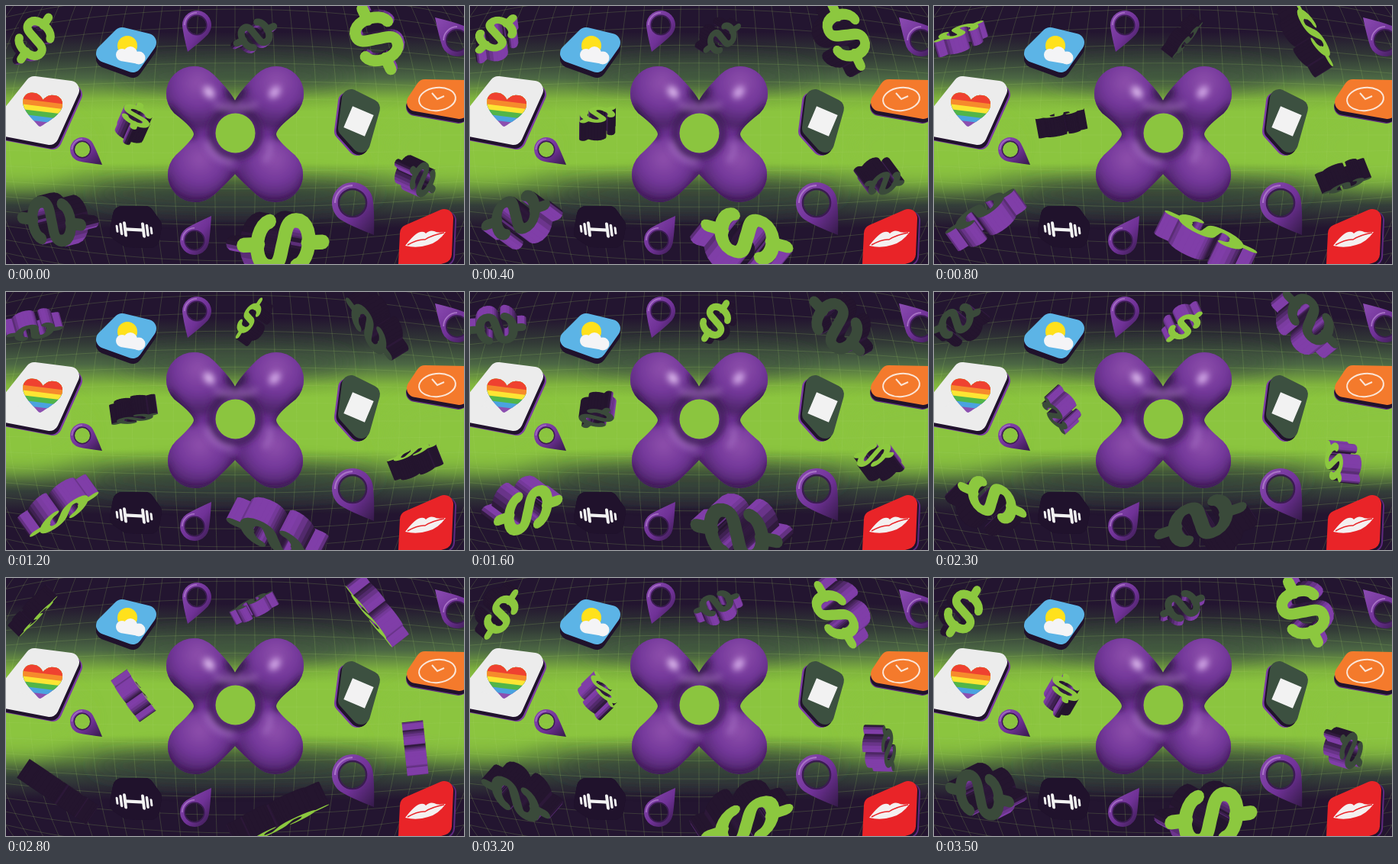
An HTML page with a canvas for the animation above (3.6 s loop, 600 px wide and 338 px high).

```html
<!DOCTYPE html>
<html lang="en">
<head>
<meta charset="utf-8">
<title>Spinning dollars</title>
<style>
html, body { margin: 0; width: 100%; height: 100%; overflow: hidden; background: #231530; }
svg, canvas { position: absolute; left: 0; top: 0; width: 600px; height: 338px; }
</style>
</head>
<body>
<svg viewBox="0 0 600 338">
  <defs>
    <linearGradient id="band" x2="0" y2="1">
      <stop offset=".1" stop-color="#231530"/>
      <stop offset=".2" stop-color="#333c37"/>
      <stop offset=".28" stop-color="#4c6844"/>
      <stop offset=".36" stop-color="#80b43e"/>
      <stop offset=".41" stop-color="#8bc53f"/>
      <stop offset=".61" stop-color="#8bc53f"/>
      <stop offset=".7" stop-color="#5c813d"/>
      <stop offset=".77" stop-color="#35403a"/>
      <stop offset=".86" stop-color="#231530"/>
    </linearGradient>
    <radialGradient id="lobe" cx=".52" cy=".32" r=".7">
      <stop offset="0" stop-color="#8f50ac"/>
      <stop offset=".5" stop-color="#73379a"/>
      <stop offset="1" stop-color="#43205c"/>
    </radialGradient>
    <linearGradient id="ring" x2="1" y2="1">
      <stop offset="0" stop-color="#8b4cb2"/>
      <stop offset=".55" stop-color="#6f3196"/>
      <stop offset="1" stop-color="#341a48"/>
    </linearGradient>
    <filter id="soft" x="-50%" y="-50%" width="200%" height="200%"><feGaussianBlur stdDeviation="4"/></filter>
    <filter id="haze" x="-50%" y="-50%" width="200%" height="200%"><feGaussianBlur stdDeviation="12"/></filter>
    <path id="body" d="M300,124 Q294,112 271.500,89.500 A36,36 0 1 0 220.500,140.500 Q246,160 246,168 Q246,174 222.500,195.500 A36,36 0 1 0 273.500,246.500 Q294,227 300,220 Q306,227 327.500,246.500 A36,36 0 1 0 378.500,195.500 Q354,175 354,168 Q354,160 379.500,140.500 A36,36 0 1 0 328.500,89.500 Q306,112 300,124Z"/>
    <clipPath id="bodyClip"><use href="#body"/></clipPath>
    <clipPath id="heart"><path d="M0,23 C-10,14 -27,3 -26,-10 C-25,-23 -7,-25 0,-13 C7,-25 25,-23 26,-10 C27,3 10,14 0,23Z"/></clipPath>
  </defs>

  <rect width="600" height="338" fill="url(#band)"/>
  <g filter="url(#haze)">
    <ellipse cx="300" cy="92" rx="150" ry="20" fill="#3d4f3c" opacity=".6"/>
    <ellipse cx="300" cy="246" rx="190" ry="20" fill="#303a37" opacity=".7"/>
    <ellipse cx="15" cy="185" rx="90" ry="50" fill="#8bc53f" opacity=".85"/>
    <ellipse cx="585" cy="185" rx="90" ry="50" fill="#8bc53f" opacity=".85"/>
  </g>
  <path id="grid" fill="none" stroke="#a5d66b" stroke-width=".7" opacity=".28"/>

  <!-- centre sculpture -->
  <use href="#body" fill="#6a3090"/>
  <g clip-path="url(#bodyClip)">
    <g fill="url(#lobe)" filter="url(#soft)">
      <circle cx="250" cy="117" r="44"/><circle cx="352" cy="117" r="44"/>
      <circle cx="252" cy="216" r="44"/><circle cx="350" cy="216" r="44"/>
    </g>
    <g filter="url(#soft)" fill="none">
      <path d="M208,225 C212,264 275,275 300,222 C325,275 392,264 394,222" stroke="#2b153c" stroke-width="9" opacity=".75"/>
      <path d="M211,132 Q236,158 246,172M391,132 Q362,158 354,174M290,108 L300,126 L312,108" stroke="#2b153c" stroke-width="10" opacity=".85"/>
      <circle cx="300" cy="166" r="31" stroke="#3c1c55" stroke-width="8"/>
      <path d="M262,178 Q270,203 298,206M338,204 Q348,194 345,178M272,128 Q300,138 330,128" stroke="#ad78cb" stroke-width="5" opacity=".8"/>
      <ellipse cx="266" cy="113" rx="6" ry="9" fill="#e0bdf0" transform="rotate(-40 266 113)"/>
      <ellipse cx="352" cy="113" rx="6" ry="9" fill="#d5acea" transform="rotate(40 352 113)"/>
    </g>
  </g>
  <circle cx="300.500" cy="166.500" r="26" fill="#8bc53f"/>

  <g id="tiles" stroke-width="24" stroke-linejoin="round"></g>
  <circle cx="159" cy="52" r="13" fill="#ffe11c"/>
  <g fill="#f4f4f6"><circle cx="152" cy="64" r="8"/><circle cx="163" cy="62" r="9"/><circle cx="174" cy="68" r="8.500"/><path d="M150,72 152,60 176,62 174,76Z"/></g>
  <g transform="translate(47 136) rotate(7)"><g clip-path="url(#heart)" id="stripes"></g></g>
  <g fill="#f2f2f2" transform="translate(168 293) rotate(3) skewX(10)">
    <rect x="-12" y="-2" width="24" height="4"/>
    <rect x="-14" y="-10" width="4" height="20" rx="2"/><rect x="10" y="-10" width="4" height="20" rx="2"/>
    <rect x="-19" y="-8" width="3.500" height="16" rx="1.700"/><rect x="15.500" y="-8" width="3.500" height="16" rx="1.700"/>
    <rect x="-24" y="-5" width="3" height="10" rx="1.500"/><rect x="21" y="-5" width="3" height="10" rx="1.500"/>
  </g>
  <rect x="-15" y="-15" width="30" height="30" fill="#f2f2f2" transform="translate(462 151) rotate(23)"/>
  <g fill="none" stroke="#fbe6d8" stroke-width="2">
    <ellipse cx="565" cy="122" rx="24" ry="15" transform="rotate(-6 565 122)"/>
    <path d="M558,114 565,122 574,118"/>
  </g>
  <path d="M523,314 Q536,297 543,296 Q548,295 550,298 Q555,293 561,295 Q565,298 576,296 Q566,310 553,313 Q538,318 523,314Z" fill="#f4f0f0"/>
  <path d="M526,313 Q540,305 549,306 Q558,300 574,297" fill="none" stroke="#e92428" stroke-width="1.500"/>

  <g id="pins"></g>
</svg>
<canvas id="stage" width="1200" height="676"></canvas>

<script>
const $ = id => document.getElementById(id);
const { PI, sin, cos, atan2, min, max } = Math;
const rad = PI / 180;

// Barrel-warped grid
let grid = '';
const warp = (u, v) => [300 + 350 * u * (1 - .18 * v * v), 169 + 212 * v * (1 - .18 * u * u)]
  .map(n => n.toFixed(1)).join();
const steps = Array.from({ length: 25 }, (_, k) => (k - 12) / 10);
const line = point => 'M' + steps.map(point).join('L');
for (let i = -15; i <= 15; i++) grid += line(s => warp(i / 13, s));
for (let i = -10; i <= 10; i++) grid += line(s => warp(s, i / 9));
$('grid').setAttribute('d', grid);

// Rounded tiles: inner corners, face colour, side offset, side colour
const purple = '#7b3ca3', night = '#20122c';
const tiles = [
  ['152,40 185,48 166,75 130,62', '#5cb4e6', 0, 7, night],
  ['37,104 84,110 57,170 -6,158', '#ececec', 4, 6, purple],
  ['152,274 182,274 192,288 189,305 160,304 148,296', night, 0, 0, night],
  ['452,121 478,134 465,180 447,160', '#3c5040', -5, 4, purple],
  ['549,108 606,109 594,136 537,126', '#f47a2c', -1, 6, '#5e2a80'],
  ['528,298 574,278 572,325 526,338', '#e92428', 4, 3, '#5e2a80']
];
const slab = (pts, color, x, y) =>
  `<polygon points="${pts}" fill="${color}" stroke="${color}" transform="translate(${x} ${y})"/>`;
$('tiles').innerHTML = tiles.map(([pts, face, x, y, side]) =>
  slab(pts, side, x, y) + slab(pts, night, x / 2, y * .8) + slab(pts, face, 0, 0)).join('');

$('stripes').innerHTML = ['#ef4130', '#f68a2c', '#fde533', '#52b548', '#4aa3df', '#8c4fb0']
  .map((c, i) => `<rect x="-30" y="-30" width="60" height="${19 + i * 6.6}" fill="${c}"/>`).reverse().join('');

// Map pins: ring centre, radius, tip
const pins = [[250, 25, 19, 238, 60], [591, 45, 21, 562, 15], [100, 188, 16, 126, 208],
  [454, 258, 27, 482, 300], [247, 307, 19, 269, 275]];
const circle = (x, y, r) => `M${x - r},${y}a${r},${r} 0 1 0 ${2 * r},0a${r},${r} 0 1 0 ${-2 * r},0Z`;
$('pins').innerHTML = pins.map(([x, y, r, tx, ty]) => {
  const a = atan2(ty - y, tx - x);
  const at = (d, k) => `${x + k * r * cos(a + d)},${y + k * r * sin(a + d)}`;
  const drop = `M${at(1.2, 1)}Q${at(.62, 1.15)} ${tx},${ty}Q${at(-.62, 1.15)} ${at(-1.2, 1)}A${r},${r} 0 1 0 ${at(1.2, 1)}Z`;
  return `<path fill="url(#ring)" fill-rule="evenodd" d="${drop}${circle(x, y, r * .64)}"/>
    <circle cx="${x}" cy="${y}" r="${r * .67}" fill="none" stroke="#3a1c50" stroke-width="${r * .09}"/>
    <path d="M${x - r * .85},${y}A${r * .85},${r * .85} 0 0 1 ${x},${y - r * .85}" fill="none" stroke="#a873c6" stroke-width="${r * .08}"/>`;
}).join('');

// Dollar glyph as rounded strokes; each outline vertex is [x, y, nx, ny]
const W = .15;
function outline(pts) {
  const n = pts.length, left = [], right = [];
  const add = (list, p, a) => list.push([p[0] + W * cos(a), p[1] + W * sin(a), cos(a), sin(a)]);
  const heading = i => {
    const a = pts[max(i - 1, 0)], b = pts[min(i + 1, n - 1)];
    return atan2(b[1] - a[1], b[0] - a[0]);
  };
  pts.forEach((p, i) => add(left, p, heading(i) - PI / 2));
  for (let k = 1; k < 6; k++) add(left, pts[n - 1], heading(n - 1) - PI / 2 + k * PI / 6);
  for (let i = n - 1; i >= 0; i--) add(right, pts[i], heading(i) + PI / 2);
  for (let k = 1; k < 6; k++) add(right, pts[0], heading(0) + PI / 2 + k * PI / 6);
  return left.concat(right);
}
function bezier(a, b, c, d) {
  return Array.from({ length: 12 }, (_, i) => {
    const t = i / 12, s = 1 - t;
    return [0, 1].map(k => s * s * s * a[k] + 3 * s * s * t * b[k] + 3 * s * t * t * c[k] + t * t * t * d[k]);
  });
}
const half = [...bezier([.46, -.3], [.38, -.64], [-.46, -.7], [-.46, -.28]),
  ...bezier([-.46, -.28], [-.46, -.06], [-.2, -.06], [0, 0])];
const curve = [...half, [0, 0], ...half.map(([x, y]) => [-x, -y]).reverse()];
const glyph = [curve, [[0, -.55], [0, -.88]], [[0, .55], [0, .88]]].map(outline);

// x, y, half length, depth, axis angle, tilt, glyph turn, phase
const signs = [
  [35, 43, 38, .55, -31, 14, 66, 5],
  [325, 39, 31, .6, 140, 12, 75, 180],
  [486, 42, 50, .55, 55, 3, -80, 5],
  [167, 154, 32, .8, -68, 57, -90, 3],
  [536, 223, 34, .8, 212, 52, 90, 190],
  [68, 280, 53, .55, 0, 34, -90, 190],
  [356, 310, 65, .5, 0, 25, 90, 5]
];
const ctx = $('stage').getContext('2d');
const rot = (a, b, t) => [a * cos(t) - b * sin(t), a * sin(t) + b * cos(t)];
const dark = [36, 21, 46], lit = [128, 62, 168];

function drawSign([cx, cy, size, depth, axis, tilt, turn, phase], angle) {
  const spin = (x, y, z) => {
    [x, y] = rot(x, y, turn * rad);
    [z, x] = rot(z, x, tilt * rad);
    [y, z] = rot(y, z, (angle - phase) * rad);
    [x, y] = rot(x, y, axis * rad);
    return [x, y, z];
  };
  const put = (x, y, z) => spin(x, y, z).map((v, i) => v * size + [cx, cy, 0][i]);
  const trace = pts => {
    pts.forEach((p, i) => i ? ctx.lineTo(p[0], p[1]) : ctx.moveTo(p[0], p[1]));
    ctx.closePath();
  };
  const h = depth / 2, walls = [];
  for (const ring of glyph)
    ring.forEach((p, i) => {
      const q = ring[(i + 1) % ring.length];
      const nx = (p[2] + q[2]) / 2, ny = (p[3] + q[3]) / 2;
      if (spin(nx, ny, 0)[2] <= 0) return;
      const quad = [put(p[0], p[1], -h), put(q[0], q[1], -h), put(q[0], q[1], h), put(p[0], p[1], h)];
      // The shading is fixed to the glyph and turns with it
      const tone = min(1, max(0, .1 + 1.1 * nx + .25 * ny));
      walls.push({ quad, z: quad.reduce((s, v) => s + v[2], 0), tone });
    });
  walls.sort((a, b) => a.z - b.z);
  ctx.lineWidth = .6;
  for (const { quad, tone } of walls) {
    ctx.fillStyle = ctx.strokeStyle = `rgb(${dark.map((d, i) => d + (lit[i] - d) * tone)})`;
    ctx.beginPath();
    trace(quad);
    ctx.fill();
    ctx.stroke();
  }
  const front = spin(0, 0, 1)[2] > 0;
  ctx.fillStyle = front ? '#8cc83f' : '#3a4a3a';
  ctx.beginPath();
  for (const ring of glyph) trace(ring.map(p => put(p[0], p[1], front ? h : -h)));
  ctx.fill();
}

function frame() {
  const step = Math.floor(performance.now() % 3600 / 100);
  ctx.setTransform(2, 0, 0, 2, 0, 0);
  ctx.clearRect(0, 0, 600, 338);
  for (const s of signs) drawSign(s, step * 10);
  requestAnimationFrame(frame);
}
frame();
</script>
</body>
</html>
```
